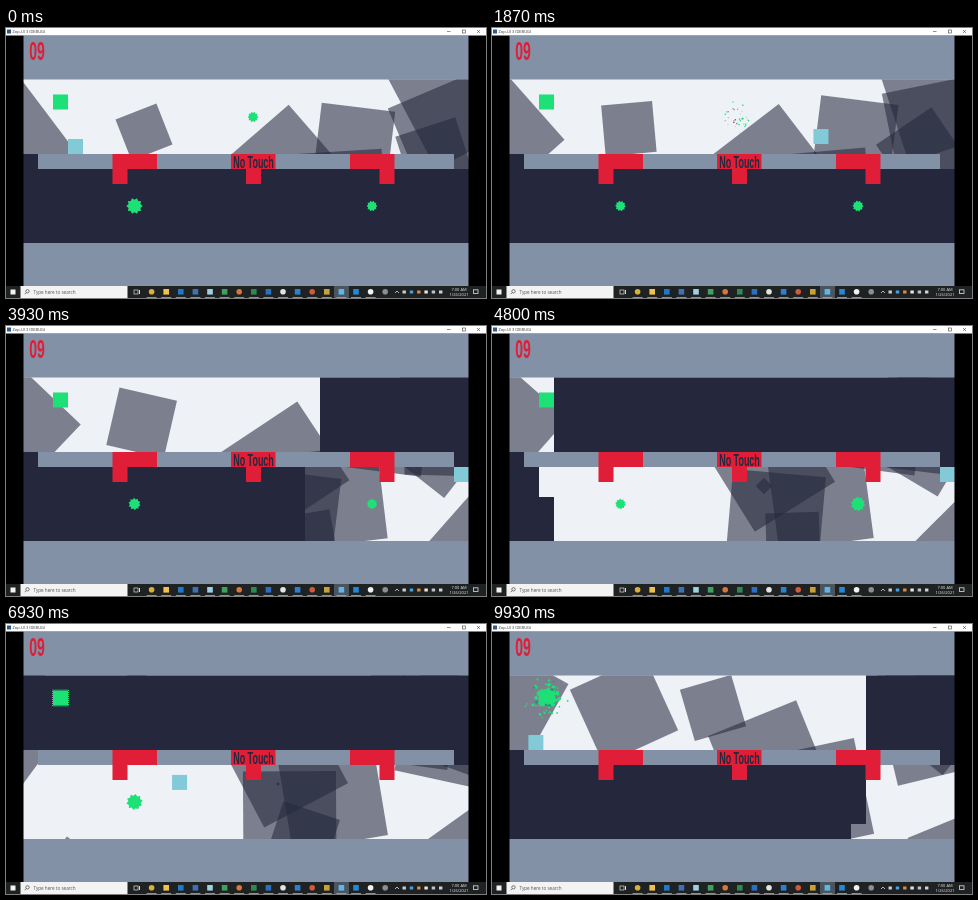
Recreate the animation shown at these times as an HTML page with a canvas. Size 480 px wide and 270 px high, loop 9990 ms.

```html
<!DOCTYPE html>
<html lang="en">
<head>
<meta charset="utf-8">
<title>Platform game</title>
<style>
  html, body { margin: 0; width: 100%; height: 100%; overflow: hidden; background: #000; }
  canvas { display: block; width: 480px; height: 270px; }
</style>
</head>
<body>
<canvas id="stage" width="480" height="270"></canvas>
<script>
const ctx = document.getElementById('stage').getContext('2d');
const LOOP = 9990, FPS = 15;
const INK = '#25283c', PAPER = '#eef1f6', SLATE = '#8391a6', RED = '#e01e37',
      GREEN = '#1de077', CYAN = '#82cad8';
const LEFT = 17, RIGHT = 463, TOP = 51.5, FLOOR = 126, UNDER = 141, BOTTOM = 215;
const COLS = 30, ROWS = 5, CELL_MS = 5.2;
const SPEED = 0.139, JUMP_MS = 650, JUMP_H = 36;
const SWEEP_1 = 3388, SWEEP_2 = 8693, CELLS = COLS * ROWS * 2;
const TURN = 4905, RETURN = 9794, GOAL_ON = 7300;

// Drifting squares: x, y, side, angle at the start of the loop, then at its end.
const squares = [
  [-43, 108, 161, 53, -33, 91, 161, 29],
  [138, 104, 44, -21.5, 132, 86, 82, 66],
  [278, 143, 94, -41, 278, 138, 95, -22],
  [221, 84, -50, -60, 221, 84, 54, -16],
  [348, 116, 74, 7, 428, 88, 94, 8],
  [332, 170, 93, -3.5, 324, 172, 98, -12],
  [455, 60, 120, -28, 455, 56, 116, 25],
  [450, 108, 104, -23, 444, 92, 84, 39],
  [429, 129, 63, -18, 437, 111, 84, -104],
  [283, 193, 93, 17, 284, 194, 93, -8],
  [311, 210, 40, -47, 290, 217, 68, 47],
  [272, 160, 32, 30, 272, 160, -10, 60],
  [473, 238, 116, -66, 473, 238, 88, -22],
  [62, 221, -60, 30, 62, 221, 44, 42],
  [-6, 217, -88, 20, -6, 217, 83, 33]
];

const stars = [
  { x: 247, y: 89, phase: .4, taken: 1230 },
  { x: 366, y: 178, phase: .55, taken: 5480 },
  { x: 128.5, y: 178, phase: 0, taken: 7210 }
];

const jumps = [130, 1000, 1818, 5107, 6042, 6885];
// Time and the resting height the player moves to.
const levels = [[2777, 126], [3383, 141], [8006, 126], [8690, 111]];

const rand = n => { const v = Math.sin(n * 127.1 + 3.7) * 43758.5453; return v - Math.floor(v); };
const clamp = (v, a, b) => Math.max(a, Math.min(b, v));
const lerp = (a, b, u) => a + (b - a) * u;

function rect(color, x, y, w, h) {
  ctx.fillStyle = color;
  ctx.fillRect(x, y, w, h);
}

function disc(color, x, y, r) {
  ctx.fillStyle = color;
  ctx.beginPath();
  ctx.arc(x, y, r, 0, 7);
  ctx.fill();
}

function turned(color, x, y, side, deg) {
  ctx.save();
  ctx.translate(x, y);
  ctx.rotate(deg * Math.PI / 180);
  rect(color, -side / 2, -side / 2, side, side);
  ctx.restore();
}

function spiky(color, x, y, r, points, spin) {
  ctx.fillStyle = color;
  ctx.beginPath();
  for (let i = 0; i < points * 2; i++) {
    const a = spin + i * Math.PI / points, d = i % 2 ? r * .76 : r;
    ctx.lineTo(x + Math.cos(a) * d, y + Math.sin(a) * d);
  }
  ctx.fill();
}

function text(str, x, y, size, color, align = 'left') {
  ctx.font = `${size}px "Open Sans", sans-serif`;
  ctx.textAlign = align;
  ctx.fillStyle = color;
  ctx.fillText(str, x, y);
}

// Condensed display lettering.
function headline(str, x, y, size, color) {
  ctx.save();
  ctx.translate(x, y);
  ctx.scale(.56, 1);
  ctx.font = `bold ${size}px "Liberation Sans", Arial, sans-serif`;
  ctx.textAlign = 'center';
  ctx.fillStyle = color;
  ctx.fillText(str, 0, 0);
  ctx.restore();
}

function drawBackdrop(u) {
  rect(PAPER, LEFT, TOP, RIGHT - LEFT, BOTTOM - TOP);
  ctx.save();
  ctx.beginPath();
  ctx.rect(LEFT, TOP, RIGHT - LEFT, BOTTOM - TOP);
  ctx.clip();
  for (const q of squares) {
    const [x, y, side, angle] = [0, 1, 2, 3].map(i => lerp(q[i], q[i + 4], u));
    if (side > 0) turned('rgba(37,40,60,.56)', x, y, side, angle);
  }
  ctx.restore();
}

// The lanes swap cell by cell, column after column, nearest row first.
function drawLanes(t) {
  const back = t >= SWEEP_2;
  const n = (t - (back ? SWEEP_2 : SWEEP_1)) / CELL_MS;
  const colX = c => Math.round(LEFT + c * (RIGHT - LEFT) / COLS);
  const rowY = r => Math.round(r * (BOTTOM - UNDER) / ROWS);
  const roof = FLOOR - TOP;
  for (let c = 0; c < COLS; c++) {
    const step = back ? c : COLS - 1 - c;
    for (let r = 0; r < ROWS; r++) {
      for (const upper of [true, false]) {
        const opening = upper === back;
        const done = step * ROWS * 2 + (opening ? 0 : ROWS) + r < n;
        if (done === opening) continue;
        const next = upper && r === ROWS - 1 ? roof : rowY(r + 1);
        const y = upper ? FLOOR - next : UNDER + rowY(r);
        rect(INK, colX(c), y, colX(c + 1) - colX(c), next - rowY(r));
      }
    }
  }
  const near = n > 0, far = n < CELLS;
  if (back ? near : far) rect(INK, LEFT, FLOOR, 15, 15);
  if (back ? far : near) rect(INK, 448, FLOOR, 15, 15);
}

function drawCue(t, start, x, y) {
  if (t < start - 230 || t > start + 50) return;
  ctx.lineWidth = 1;
  ctx.strokeStyle = '#9da0ad';
  ctx.strokeRect(x + .5, y + .5, 14, 14);
  ctx.strokeRect(x + 15.5, y + .5, 14, 14);
  ctx.strokeStyle = '#fff';
  ctx.beginPath();
  ctx.moveTo(x + 29.5, y + 5);
  ctx.lineTo(x + 29.5, y + 14.5);
  ctx.lineTo(x + 21, y + 14.5);
  ctx.stroke();
}

function drawPlatform() {
  rect(SLATE, 32, FLOOR, 416, 15);
  for (const [bar, stem] of [[106.5, 106.5], [225, 240], [344, 373.5]]) {
    rect(RED, bar, FLOOR, 44.5, 15);
    rect(RED, stem, UNDER, 15, 15);
  }
  headline('No Touch', 247.5, 140, 16, INK);
}

function drawStar(s, t) {
  if (t < s.taken) {
    const beat = Math.max(0, Math.cos((t / 1386 - s.phase) * 2 * Math.PI));
    spiky(GREEN, s.x, s.y, 5.4 + 2.8 * beat * beat, 10, t * .0007);
    return;
  }
  const u = (t - s.taken) / 1000;
  if (u > 1) return;
  for (let i = 0; i < 34; i++) {
    const a = rand(i + s.x) * 2 * Math.PI;
    const d = (4 + 16 * rand(i + 50)) * (1 - (1 - u) ** 2);
    const color = i % 6 === 0 ? RED : i % 4 === 0 ? SLATE : GREEN;
    turned(color, s.x - 2 + Math.cos(a) * d * .75, s.y + Math.sin(a) * d,
      (1 - u) * (1.5 + 2.5 * rand(i + 90)), i * 40);
  }
}

function drawGoal(t) {
  const x = 54.5, y = 74;
  rect(GREEN, 47, 66.5, 15, 15);
  if (t > stars[1].taken) {
    ctx.strokeStyle = GREEN;
    ctx.lineWidth = 1;
    ctx.setLineDash([1, 1]);
    ctx.strokeRect(46.5, 66, 16, 16);
    ctx.setLineDash([]);
  }
  if (t < GOAL_ON) return;
  for (let i = 0; i < 60; i++) {
    const age = t - GOAL_ON - rand(i) * 900;
    if (age < 0) continue;
    const u = age % 900 / 900, a = (rand(i + 200) + Math.floor(age / 900) * .37) * 2 * Math.PI;
    const d = 6 + (6 + 14 * rand(i + 300)) * u;
    turned(i % 9 ? GREEN : '#2b8f84', x + Math.cos(a) * d, y + Math.sin(a) * d,
      (1 - u * .7) * (2 + 2.8 * rand(i + 400)), i * 33);
  }
}

function drawPlayer(t) {
  let x = Math.min(448, 62 + SPEED * t);
  if (t > TURN) x = Math.max(LEFT, 448 - SPEED * (t - TURN));
  if (t > RETURN) x = LEFT + SPEED * (t - RETURN);
  let y = 111;
  for (const [at, to] of levels) y = lerp(y, to, clamp((t - at) / 120, 0, 1) ** 2);
  for (const at of jumps) {
    const u = (t - at) / JUMP_MS;
    if (u > 0 && u < 1) y += 4 * JUMP_H * u * (1 - u) * (t < TURN ? -1 : 1);
  }
  rect(CYAN, x, y, 15, 15);
}

function drawWindow() {
  rect('#000', 0, 7, 17.5, 251);
  rect('#000', 462.5, 7, 17.5, 251);
  rect('#fff', 0, 0, 480, 7.5);
  rect('#2f5b8c', 1, 1.5, 4, 4);
  text('Zop-Ul 3 (DEBUG)', 6.5, 5.2, 4, '#333');
  ctx.strokeStyle = '#444';
  ctx.lineWidth = .6;
  ctx.beginPath();
  ctx.moveTo(441, 3.5); ctx.lineTo(444.5, 3.5);
  ctx.moveTo(471, 2); ctx.lineTo(474, 5);
  ctx.moveTo(474, 2); ctx.lineTo(471, 5);
  ctx.stroke();
  ctx.strokeRect(456.5, 2, 3, 3);
}

const icons = ['#d9d9d9', '#d8b13c', '#f2c14b', '#1f78c8', '#3f6fb5', '#9fd0e0', '#3fa060',
  '#d9773a', '#2b8a50', '#2b6fc0', '#e4e4e4', '#2f7fd0', '#d05a3c', '#c9a13a', '#5fb4e8',
  '#2488d8', '#f2f2f2', '#8a8f94'];
const round = [1, 7, 10, 12, 16, 17];

function drawTaskbar() {
  rect('#1f2223', 0, 258, 480, 12);
  rect('#f3f3f3', 4.5, 261.5, 5, 5);
  rect('#f3f3f3', 14.5, 258, 107, 12);
  ctx.strokeStyle = '#444';
  ctx.lineWidth = .7;
  ctx.beginPath();
  ctx.arc(21.5, 263.3, 1.7, 0, 7);
  ctx.moveTo(20.2, 264.6);
  ctx.lineTo(18.7, 266.2);
  ctx.stroke();
  text('Type here to search', 27.5, 265.8, 4.6, '#555');
  rect('#4a555e', 328, 258, 15, 12);
  icons.forEach((color, i) => {
    const x = 131 + i * 14.6;
    if (round.includes(i)) disc(color, x, 263.8, 2.8);
    else if (i === 0) {
      ctx.strokeStyle = color;
      ctx.strokeRect(x - 3, 262, 4, 4);
      rect(color, x + 2, 262, 1, 4);
    } else rect(color, x - 2.8, 261, 5.6, 5.6);
    if (i > 0 && i < 17) rect('#76b9ed', x - 5, 269.2, 10, .8);
  });
  ctx.strokeStyle = '#ddd';
  ctx.lineWidth = .8;
  ctx.beginPath();
  ctx.moveTo(389, 265); ctx.lineTo(391, 263); ctx.lineTo(393, 265);
  ctx.stroke();
  ['#c9ccd0', '#4a9fe0', '#e08a3a', '#e8e8e8', '#bfc3c8', '#cfd2d6'].forEach((c, i) =>
    rect(c, 396.5 + i * 7.3, 262.5, 3.4, 3));
  text('7:00 AM', 453, 262.8, 4, '#eee', 'center');
  text('1/26/2021', 453, 268.2, 4, '#eee', 'center');
  ctx.strokeRect(467.5, 261.8, 4.5, 3.8);
}

function draw(t) {
  rect('#000', 0, 0, 480, 270);
  rect(SLATE, LEFT, 7.5, RIGHT - LEFT, 250.5);
  drawBackdrop(t / LOOP);
  drawLanes(t);
  drawCue(t, SWEEP_1, 433, UNDER);
  drawCue(t, SWEEP_2, LEFT, 111);
  drawPlatform();
  stars.forEach(s => drawStar(s, t));
  drawGoal(t);
  drawPlayer(t);
  headline('09', 31, 32, 25, RED);
  drawWindow();
  drawTaskbar();
}

const start = performance.now();
function tick() {
  const t = (performance.now() - start) % LOOP;
  draw(Math.floor((t + 4) * FPS / 1000) * 1000 / FPS);
  requestAnimationFrame(tick);
}
tick();
</script>
</body>
</html>
```
